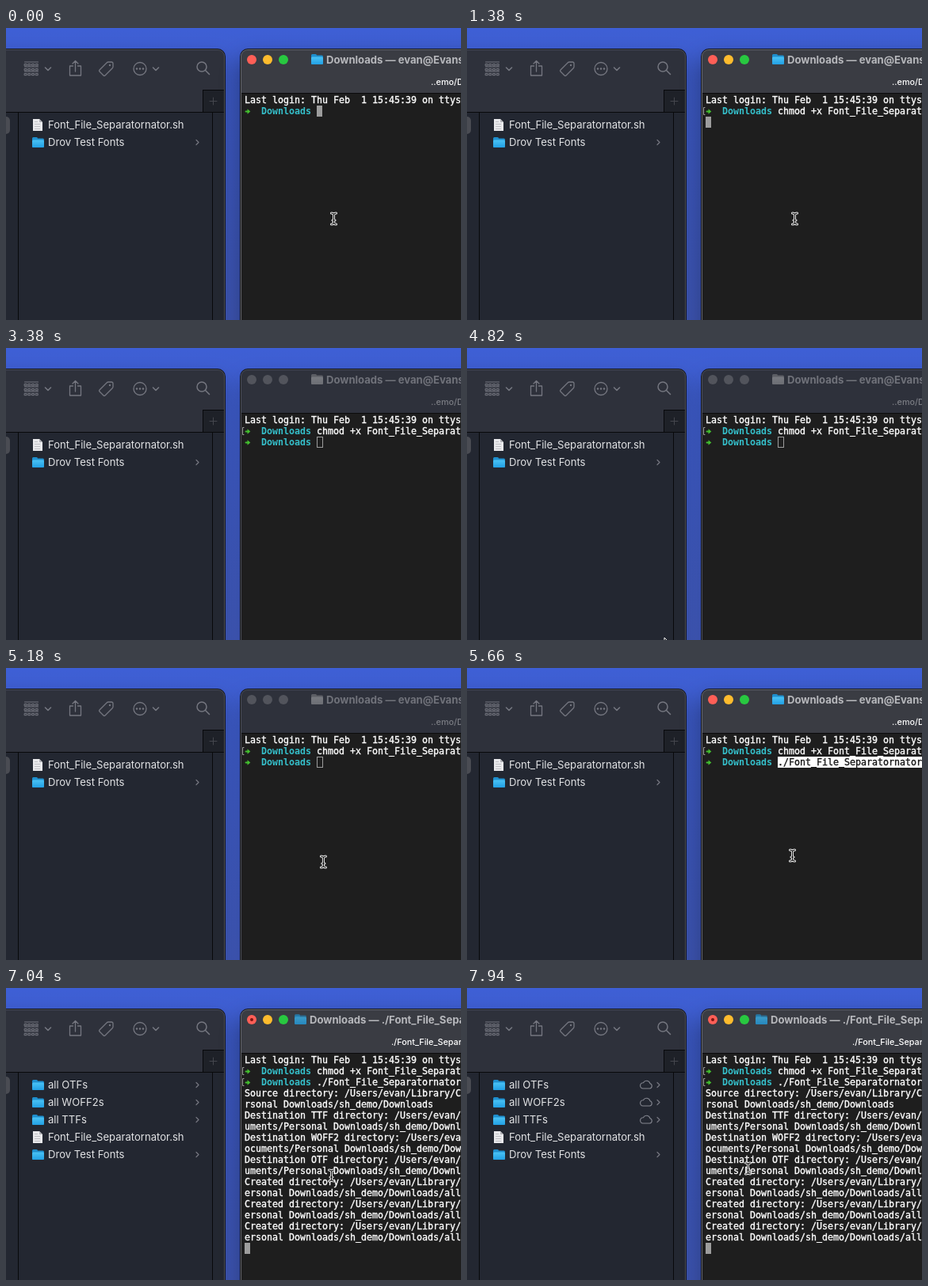
Recreate the animation shown at these times as an HTML page with a canvas. Size 574 by 369 pixels, loop 7.99 s.

```html
<!DOCTYPE html>
<html>
<head>
<meta charset="utf-8">
<style>
  html, body { margin: 0; width: 100%; height: 100%; overflow: hidden; background: #3c5bd0; }
  canvas { display: block; }
</style>
</head>
<body>
<canvas id="stage" width="574" height="369"></canvas>
<script>
const ctx = document.getElementById('stage').getContext('2d');
const LOOP = 7990;
const MONO = '11.63px "DejaVu Sans Mono", monospace';
const SANS = 'Inter, sans-serif';
const LEFT = 301, CELL = 7, LINE = 14, TOP = 84, PROMPT_END = 392;
const USER = 'evan', SCRIPT = 'Font_File_Separatornator.sh';

// Terminal output; each line is cut off by the stage edge.
const home = `/Users/${USER}/Library/Cloud`;
const path = 'Personal Downloads/sh_demo/Downloads';
const created = [`Created directory: ${home}`, path.slice(1) + '/all'];
const output = [
  `Source directory: ${home}`, path.slice(2),
  `Destination TTF directory: ${home}`, 'uments/' + path,
  `Destination WOFF2 directory: ${home}`, 'ocuments/' + path,
  `Destination OTF directory: ${home}`, 'uments/' + path,
  ...created, ...created, ...created
];

function rect(x, y, w, h, color) {
  ctx.fillStyle = color;
  ctx.fillRect(x, y, w, h);
}

function round(x, y, w, h, r, color) {
  ctx.fillStyle = color;
  ctx.beginPath();
  ctx.roundRect(x, y, w, h, r);
  ctx.fill();
}

function text(str, x, y, font, color) {
  ctx.font = font;
  ctx.fillStyle = color;
  ctx.fillText(str, x, y);
}

function dot(x, y, r, color) {
  ctx.fillStyle = color;
  ctx.beginPath();
  ctx.arc(x, y, r, 0, 7);
  ctx.fill();
}

function stroke(d, color, width = 1.4, x = 0, y = 0) {
  ctx.save();
  ctx.translate(x, y);
  ctx.strokeStyle = color;
  ctx.lineWidth = width;
  ctx.lineCap = ctx.lineJoin = 'round';
  ctx.stroke(new Path2D(d));
  ctx.restore();
}

function folder(x, y, alpha = 1, gray = false) {
  const front = ctx.createLinearGradient(0, y + 3, 0, y + 13);
  front.addColorStop(0, gray ? '#787a80' : '#4cc4f6');
  front.addColorStop(1, gray ? '#6c6e74' : '#22a0e4');
  const back = gray ? '#5c5e65' : '#1f8fce';
  ctx.globalAlpha = alpha;
  round(x, y, 7, 4, 1.5, back);
  round(x, y + 1.5, 15, 11.5, 1.5, back);
  round(x, y + 3.5, 15, 9.5, 1.5, front);
  ctx.globalAlpha = 1;
}

function documentIcon(x, y) {
  ctx.fillStyle = '#e9e9ec';
  ctx.fill(new Path2D(`M${x} ${y}h8l4 4v11h-12z`));
  ctx.fillStyle = '#b3b4b9';
  ctx.fill(new Path2D(`M${x + 8} ${y}v4h4z`));
  for (let i = 0; i < 4; i++) rect(x + 2, y + 3 + i * 3, i < 1 ? 4 : 7, 1, '#bdbec3');
}

// Window shape: soft shadow, dark outer edge, lighter inner edge, body.
function windowFrame(x, shadow, edge, body) {
  ctx.save();
  ctx.shadowColor = `rgba(0,0,0,${shadow})`;
  ctx.shadowBlur = 28;
  ctx.shadowOffsetY = 12;
  round(x, 26, 320, 380, 10, '#14161d');
  ctx.restore();
  round(x + 1, 27, 318, 380, 9, edge);
  round(x + 2, 28, 316, 380, 8, body);
}

function wallpaper() {
  const g = ctx.createLinearGradient(0, 0, 0, 369);
  g.addColorStop(0, '#3e5fd5');
  g.addColorStop(1, '#435dc4');
  rect(0, 0, 574, 369, g);
}

function toolbar() {
  const c = '#757780';
  for (let row = 0; row < 3; row++) {
    const y = 43 + row * 6;
    stroke(`M23.5 ${y}h17`, c, 1);
    for (let i = 0; i < 4; i++) stroke(`M${23.5 + i * 4.7} ${y + 2.5}h2.6v2.2h-2.6z`, c, 1);
  }
  for (const x of [53, 189]) stroke('M-3.5 -1.5L0 2L3.5 -1.5', c, 1.6, x, 51.5);
  stroke('M-3 -3H-7V9H7V-3H3M0 4V-9M-3.5 -6L0 -9.5L3.5 -6', c, 1.3, 87.5, 51);
  stroke('M-8 2L1 -7Q2 -8 3 -8H7Q9 -8 9 -6V-2Q9 -1 8 0L-1 9Q-2 10 -3 9L-8 4Q-9 3 -8 2z', c, 1.3, 126, 51);
  dot(131, 47, 1.2, c);
  stroke('M-8 0a8 8 0 1 0 16 0a8 8 0 1 0 -16 0', c, 1.3, 169, 51.5);
  for (const x of [165, 169, 173]) dot(x, 51.5, 1.2, c);
  stroke('M-7 -1.5a6 6 0 1 0 12 0a6 6 0 1 0 -12 0M3.5 3L8.5 8', c, 1.5, 248, 50.5);
}

function finder(t) {
  windowFrame(-43, 0.25, '#4b4e57', '#2e313b');
  rect(-10, 106, 285, 263, '#232731');
  rect(248, 78, 27, 28, '#1e2128');
  rect(248, 78, 1, 28, '#08090b');
  rect(248, 78, 27, 1, '#08090b');
  rect(0, 106, 275, 1, '#08090b');
  stroke('M257 92.5h9M261.5 88v9', '#44464d', 1);
  for (const x of [15, 260]) rect(x, 107, 1, 262, '#08090b');
  round(-10, 112, 15, 22, 5, '#4a4c53');
  toolbar();

  const rows = [SCRIPT, 'Drov Test Fonts'];
  if (t >= 6740) rows.unshift('all OTFs', 'all WOFF2s', 'all TTFs');
  rows.forEach((name, i) => {
    const y = 122 + i * 22;
    text(name, 53, y + 5, '13.08px ' + SANS, '#e2e3e5');
    if (name === SCRIPT) return documentIcon(34, y - 7);
    folder(33, y - 6);
    stroke('M-1.5 -3L1.5 0L-1.5 3', '#757780', 1.2, 241.5, y + 0.5);
    if (name.startsWith('all') && t >= 7760)
      stroke('M-4 5H4.5A3.2 3.2 0 0 0 5 -1.2A4.6 4.6 0 0 0 -3.6 -2.2A3.6 3.6 0 0 0 -4 5z', '#858790', 1.1, 226, y);
  });
}

function termText(str, line, x = LEFT, color = '#ffffff', bold = '') {
  const y = TOP + line * LINE + 11;
  text(str, x, y, bold + MONO, color);
  if (bold) return;
  // A hairline outline thickens the regular weight.
  ctx.strokeStyle = color;
  ctx.lineWidth = 0.35;
  ctx.strokeText(str, x, y);
}

function prompt(line, command, entered, selected) {
  const y = TOP + line * LINE;
  stroke(`M302.5 ${y + 7.5}h3`, '#43c02f', 1.8);
  ctx.fillStyle = '#43c02f';
  ctx.fill(new Path2D(`M304.5 ${y + 4.3}L308.3 ${y + 7.5}L304.5 ${y + 10.7}z`));
  termText('Downloads', line, 322, '#35bfca', 'bold ');
  if (selected) rect(PROMPT_END, y, 182, LINE, '#ffffff');
  termText(command, line, PROMPT_END, selected ? '#151515' : '#ffffff');
  if (entered) stroke(`M300 ${y + 2.5}h-1.5v9h1.5`, '#a0a0a0', 1);
}

function block(line, x, active) {
  const y = TOP + line * LINE;
  if (active) rect(x, y, CELL, LINE, '#9d9d9d');
  else {
    ctx.strokeStyle = '#9d9d9d';
    ctx.lineWidth = 1;
    ctx.strokeRect(x + 0.5, y + 0.5, CELL, LINE - 1);
  }
}

function terminal(t) {
  const active = t < 3380 || t >= 5300;
  const running = t >= 6560, busy = t >= 6620;
  const bar = active ? '#3a3c43' : '#2e313b';
  windowFrame(295, active ? 0.45 : 0.25, active ? '#65666b' : '#4b4e57', bar);
  rect(297, 82, 277, 287, '#1e1e1e');
  rect(297, 82, 277, 1, '#0b0b0c');

  ['#ff5f57', '#febc2e', '#28c840'].forEach((c, i) => dot(310 + i * 20, 40, 6, active ? c : '#52545c'));
  if (busy) dot(310, 40, 2, '#7c1512');
  const titleX = busy ? 383 : running ? 393 : 404;
  folder(titleX - 19, 33, busy ? 0.55 : running ? 0.8 : 1, !active);
  text('Downloads — ' + (running ? './' + SCRIPT : `${USER}@Evans-Air`), titleX, 44.5,
    'bold 13.08px ' + SANS, active ? '#b7b8bc' : '#70727a');
  text(running ? './' + SCRIPT : '..emo/Downloads', t >= 7040 ? 486 : running ? 503 : 536, 72,
    '500 10.8px ' + SANS, active ? '#ffffff' : '#7b7d84');

  termText('Last login: Thu Feb  1 15:45:39 on ttys000', 0);
  prompt(1, t < 660 ? '' : 'chmod +x ' + SCRIPT, t >= 1380, t >= 660 && t < 1380);
  if (t >= 1440) prompt(2, t < 5660 ? '' : './' + SCRIPT, t >= 6500, t >= 5660 && t < 6500);
  if (running) output.forEach((str, i) => termText(str, i + 3));

  if (t < 660) block(1, PROMPT_END, true);
  else if (t >= 1380 && t < 1440) block(2, LEFT, true);
  else if (t >= 1440 && t < 5660) block(2, PROMPT_END, active);
  else if (t >= 6500) block(running ? 17 : 3, LEFT, true);
}

function beam(x, y) {
  const d = 'M-3 -7Q0 -7 0 -4.5Q0 -7 3 -7M0 -4.5V4.5M-3 7Q0 7 0 4.5Q0 7 3 7M-1.5 2h3';
  stroke(d, '#f5f5f5', 3, x, y);
  stroke(d, '#111111', 1.1, x, y);
}

function arrow(x, y) {
  const shape = new Path2D('M0 0V14L3.2 11L5.4 16L7.8 15L5.7 10.2H10z');
  ctx.save();
  ctx.translate(x, y);
  ctx.fillStyle = '#000';
  ctx.fill(shape);
  ctx.strokeStyle = '#fff';
  ctx.lineWidth = 1;
  ctx.stroke(shape);
  ctx.restore();
}

// Progress 0..1 in a fixed number of jumps; the first jump happens at start.
function steps(t, start, gap, count) {
  return Math.max(0, Math.min(count, Math.floor((t - start) / gap) + 1)) / count;
}

function pointer(t) {
  if (t < 3380) {
    const p = steps(t, 2430, 70, 6), e = p * p * (3 - 2 * p);
    beam(413.5 + 79 * e, 241 + 3 * Math.sin(2 * Math.PI * e));
  } else if (t >= 4820 && t < 7760) {
    const p = (steps(t, 4820, 60, 9) * 9 - 1) / 8, e = 1 - (1 - p) ** 2;
    const x = 249 + 161.5 * e, y = 366 - 129 * e;
    (x < 297 ? arrow : beam)(x, y);
  } else if (t >= 7760) {
    const e = steps(t, 7760, 60, 4) ** 1.5;
    beam(410.5 - 56 * e, 237 - 9 * e);
  }
}

function frame(now) {
  const t = now % LOOP;
  wallpaper();
  finder(t);
  terminal(t);
  pointer(t);
  requestAnimationFrame(frame);
}
requestAnimationFrame(frame);
</script>
</body>
</html>
```
